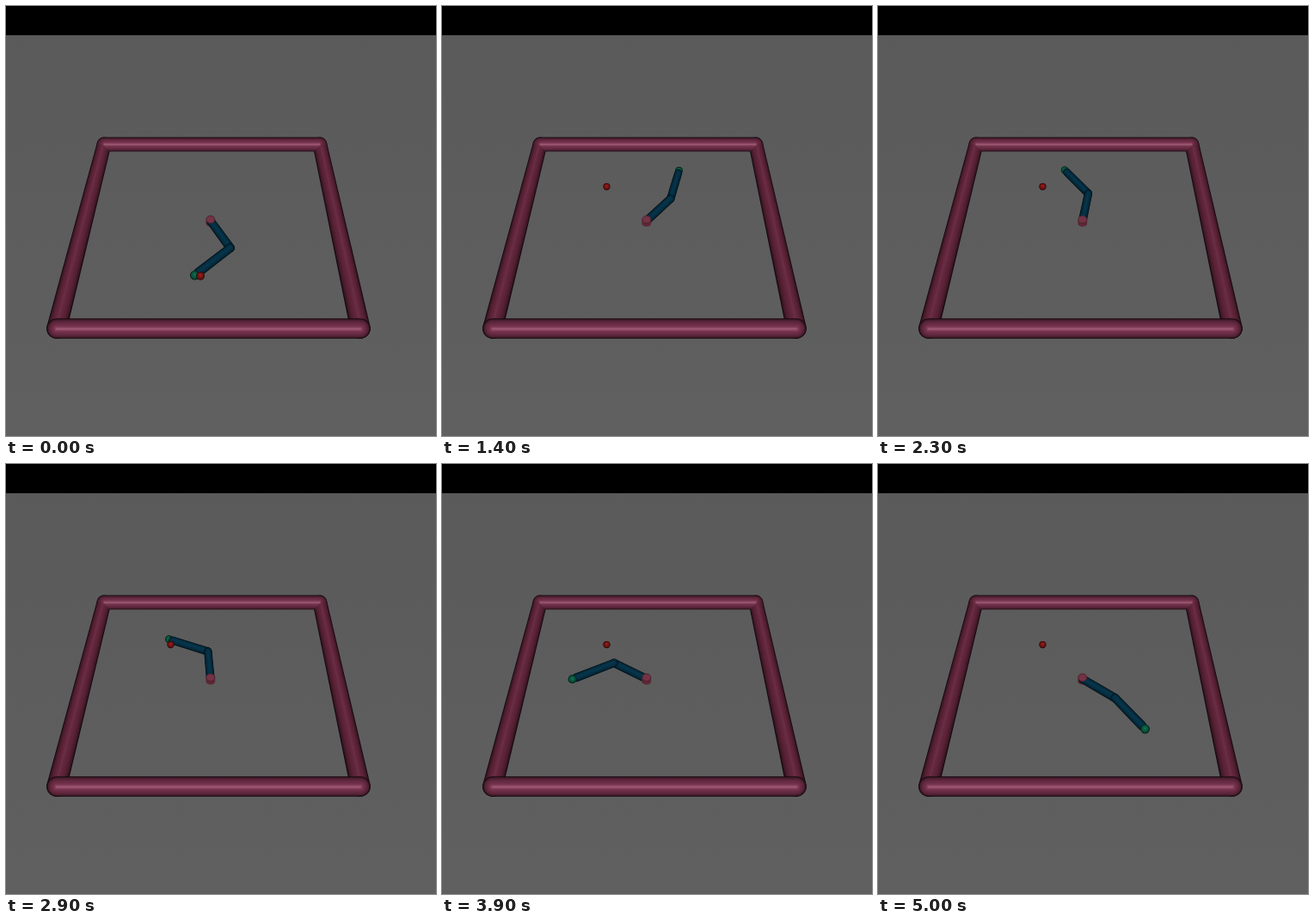
An HTML page with a canvas for the animation above (5100 ms loop, 500 by 500 pixels).

```html
<!DOCTYPE html>
<html lang="en">
<head>
<meta charset="utf-8">
<title>Two-link reacher</title>
<style>
  html, body { margin: 0; width: 100%; height: 100%; overflow: hidden; background: #000; }
  canvas { display: block; width: 500px; height: 500px; }
</style>
</head>
<body>
<canvas id="stage" width="500" height="500"></canvas>
<script>
const ctx = document.getElementById('stage').getContext('2d');
const LOOP = 5100, STEP = 100, RAD = Math.PI / 180, LAYERS = 12;
const LINK = 0.325, REACH = 0.37, FINGER = 0.034;

const RAIL = { color: [116, 48, 74], gloss: 40 };
const SIDE = { color: [98, 38, 60], gloss: 8 };
const ARM = { color: [6, 51, 72], gloss: 3 };
const TIP = { color: [12, 100, 72], gloss: 22 };
const GOAL = { color: [134, 24, 24], gloss: 24 };
const HUB = { color: [118, 52, 70], gloss: 6 };

// Key poses of the swing; angles in degrees
const KEYS = [
  { t: 100, shoulder: 1, bend: 0 },
  { t: 700, shoulder: 30.9, bend: 14 },
  { t: 1400, shoulder: 53, bend: 24.4 },
  { t: 2300, shoulder: 82.2, bend: 42 },
  { t: 3600, shoulder: 113, bend: 75.3 },
  { t: 4300, shoulder: 213.3, bend: 36.4 },
  { t: 5000, shoulder: 320.8, bend: -16.6 }
];
const OPENING = { shoulder: -62, bend: -72.4 };

// Light on a round surface: k runs from the rim (0) to the crest (1)
function tone({ color, gloss }, k) {
  const light = 0.2 + 0.8 * Math.sqrt(1 - (1 - k) ** 2), shine = gloss * k ** 7;
  return `rgb(${color.map(c => Math.round(c * light + shine)).join()})`;
}

// Perspective view of the table; the walls lie at x, y = ±1
function project(x, y) {
  const w = 1 + 0.1689 * y;
  return { x: (237.8 + 146.7 * x + 42.1 * y) / w, y: (249.9 - 61.75 * y) / w, r: 4.9 / w };
}

function capsule(p, q, rp, rq) {
  const a = Math.atan2(q.y - p.y, q.x - p.x), h = Math.PI / 2;
  ctx.beginPath();
  ctx.arc(p.x, p.y, rp, a + h, a - h);
  ctx.arc(q.x, q.y, rq, a - h, a + h);
  ctx.fill();
}

// Bars drawn layer by layer, so that joined bars meet in a mitre
function bars(...list) {
  for (let i = 0; i < LAYERS; i++) {
    for (const { p, q, size, look, dx = 0, dy = 0 } of list) {
      const k = i / LAYERS, s = size * (1 - k);
      const move = o => ({ x: o.x + dx * k * o.r, y: o.y + dy * k * o.r });
      ctx.fillStyle = tone(look, i / (LAYERS - 1));
      capsule(move(p), move(q), p.r * s, q.r * s);
    }
  }
}

function ball(p, size, look) {
  bars({ p, q: p, size, look, dy: -0.2 });
}

function drawTable() {
  const floor = ctx.createLinearGradient(0, 34, 0, 500);
  floor.addColorStop(0, '#5a5a5a');
  floor.addColorStop(1, '#606060');
  ctx.fillStyle = floor;
  ctx.fillRect(0, 0, 500, 500);
  ctx.fillStyle = '#000';
  ctx.fillRect(0, 0, 500, 34);

  const tl = project(-1, 1), tr = project(1, 1), bl = project(-1, -1), br = project(1, -1);
  bars(
    { p: tl, q: bl, size: 2, look: SIDE, dx: -0.25 },
    { p: tr, q: br, size: 2, look: SIDE, dx: 0.25 },
    { p: tl, q: tr, size: 2, look: RAIL }
  );
  bars({ p: bl, q: br, size: 2, look: RAIL, dy: 0.1 });
}

function drawPost({ x, y }) {
  ctx.fillStyle = tone(HUB, 0.3);
  ctx.beginPath();
  ctx.ellipse(x, y + 3, 5.4, 3.6, 0, 0, Math.PI);
  ctx.lineTo(x - 5.4, y - 2);
  ctx.lineTo(x + 5.4, y - 2);
  ctx.fill();
}

function drawCap({ x, y }) {
  ctx.fillStyle = tone(HUB, 0.2);
  ctx.beginPath();
  ctx.ellipse(x, y - 1.6, 5.4, 4.8, 0, 0, 7);
  ctx.fill();
  ctx.fillStyle = tone(HUB, 0.7);
  ctx.beginPath();
  ctx.ellipse(x, y - 1.6, 4.4, 3.8, 0, 0, 7);
  ctx.fill();
}

function drawArm({ shoulder, bend }) {
  const a = shoulder * RAD, b = (shoulder + bend) * RAD;
  const along = d => project(LINK * Math.cos(a) + d * Math.cos(b), LINK * Math.sin(a) + d * Math.sin(b));
  const root = project(0, 0), elbow = along(0), wrist = along(REACH - FINGER), tip = along(REACH);
  const link = (p, q) => bars({ p, q, size: 1, look: ARM, dy: -0.2 });

  // Far parts first
  const nearLast = (angle, ...parts) =>
    (Math.sin(angle) > 0 ? parts.reverse() : parts).forEach(part => part());
  const upper = () => {
    nearLast(a, () => drawPost(root), () => link(root, elbow));
    drawCap(root);
  };
  const fore = () => nearLast(b, () => link(elbow, wrist), () => ball(tip, 1, TIP));
  nearLast(b, upper, fore);
}

// Harmonic mean of the neighbouring rates: no overshoot between keys
function slope(i, part) {
  if (i === 0) return 0;
  const rate = j => (KEYS[j + 1][part] - KEYS[j][part]) / (KEYS[j + 1].t - KEYS[j].t);
  const before = rate(i - 1), after = i < KEYS.length - 1 ? rate(i) : before;
  return before * after > 0 ? 2 * before * after / (before + after) : 0;
}

function angle(t, part) {
  const next = KEYS.findIndex(key => key.t >= t), i = Math.max(0, next - 1);
  const p = KEYS[i], q = KEYS[i + 1], d = q.t - p.t, u = (t - p.t) / d, v = 1 - u;
  return v * v * (1 + 2 * u) * p[part] + u * u * (1 + 2 * v) * q[part]
    + d * u * v * (v * slope(i, part) - u * slope(i + 1, part));
}

function draw(t) {
  const opening = t < STEP;
  drawTable();
  drawArm(opening ? OPENING : { shoulder: angle(t, 'shoulder'), bend: angle(t, 'bend') });
  ball(opening ? project(-0.065, -0.557) : project(-0.343, 0.41), 0.9, GOAL);
}

const begin = performance.now();
let shown = -1;
function tick() {
  const t = Math.floor(((performance.now() - begin) % LOOP) / STEP) * STEP;
  if (t !== shown) draw(shown = t);
  requestAnimationFrame(tick);
}
tick();
</script>
</body>
</html>
```
